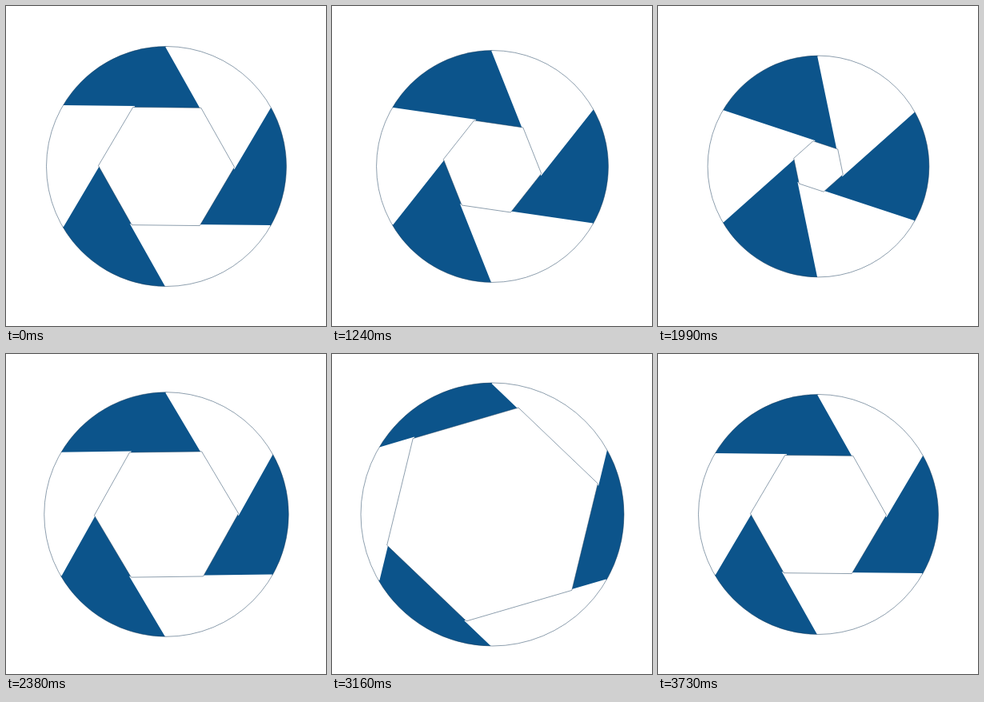
Animation, 400 px wide and 400 px high, one loop 3760 ms. Source, as an HTML page with a canvas:

```html
<!DOCTYPE html>
<html lang="en">
<head>
<meta charset="utf-8">
<title>Aperture</title>
<style>
  html, body { margin: 0; width: 100%; height: 100%; overflow: hidden; background: #fff; }
  canvas { display: block; }
</style>
</head>
<body>
<canvas id="stage" width="400" height="400"></canvas>
<script>
const ctx = document.getElementById('stage').getContext('2d');
const LOOP = 3760, START = 1000, STEP = 30;
const CENTER = 200.5;
const RAD = Math.PI / 180;

// Each pose: time in ms, circle radius, blade angle from the radius in degrees
const poses = [
  [1000, 150, 29.4],
  [1525, 138.4, 11.7],
  [2092, 138.4, 11.7],
  [2632, 164.5, 46.3],
  [3160, 164.5, 46.3],
  [3730, 150, 29.4]
];

const ease = x => x - Math.sin(2 * Math.PI * x) / (4 * Math.PI);

function poseAt(time) {
  const next = poses.findIndex(pose => pose[0] > time);
  if (next <= 0) return poses[0];
  const from = poses[next - 1], to = poses[next];
  const p = ease((time - from[0]) / (to[0] - from[0]));
  return from.map((value, i) => value + (to[i] - value) * p);
}

const polar = (radius, degrees) => [
  CENTER + radius * Math.cos(degrees * RAD),
  CENTER + radius * Math.sin(degrees * RAD)
];

function draw(time) {
  const [, radius, angle] = poseAt(time);
  const hexRadius = radius * Math.sin(angle * RAD) / Math.cos(30 * RAD);
  const rim = k => polar(radius, 60 * k - 90);
  const corner = k => polar(hexRadius, 60 * k + 30 - angle);

  ctx.fillStyle = '#fff';
  ctx.fillRect(0, 0, 400, 400);

  // Blue blades
  ctx.fillStyle = '#0c548b';
  for (const k of [1, 3, 5]) {
    ctx.beginPath();
    ctx.moveTo(...corner(k));
    ctx.lineTo(...rim(k));
    ctx.arc(CENTER, CENTER, radius, (60 * k - 90) * RAD, (60 * k - 30) * RAD);
    ctx.fill();
  }

  // White blades lie slightly over the blue ones
  ctx.strokeStyle = '#fff';
  ctx.lineWidth = 2.8;
  for (const k of [0, 2, 4]) {
    ctx.beginPath();
    ctx.moveTo(...rim(k));
    ctx.lineTo(...corner(k));
    ctx.lineTo(...rim(k + 1));
    ctx.stroke();
  }

  // Hairlines around the rim and the opening
  ctx.strokeStyle = '#1d3f5c';
  ctx.lineWidth = 0.5;
  ctx.beginPath();
  ctx.arc(CENTER, CENTER, radius, 0, 2 * Math.PI);
  ctx.stroke();
  ctx.beginPath();
  for (let k = 0; k < 6; k++) ctx.lineTo(...corner(k));
  ctx.closePath();
  ctx.stroke();
}

const begin = performance.now();
function tick() {
  const time = (performance.now() - begin) % LOOP;
  const steps = Math.max(0, Math.floor((time - START) / STEP));
  draw(START + steps * STEP);
  requestAnimationFrame(tick);
}
tick();
</script>
</body>
</html>
```
